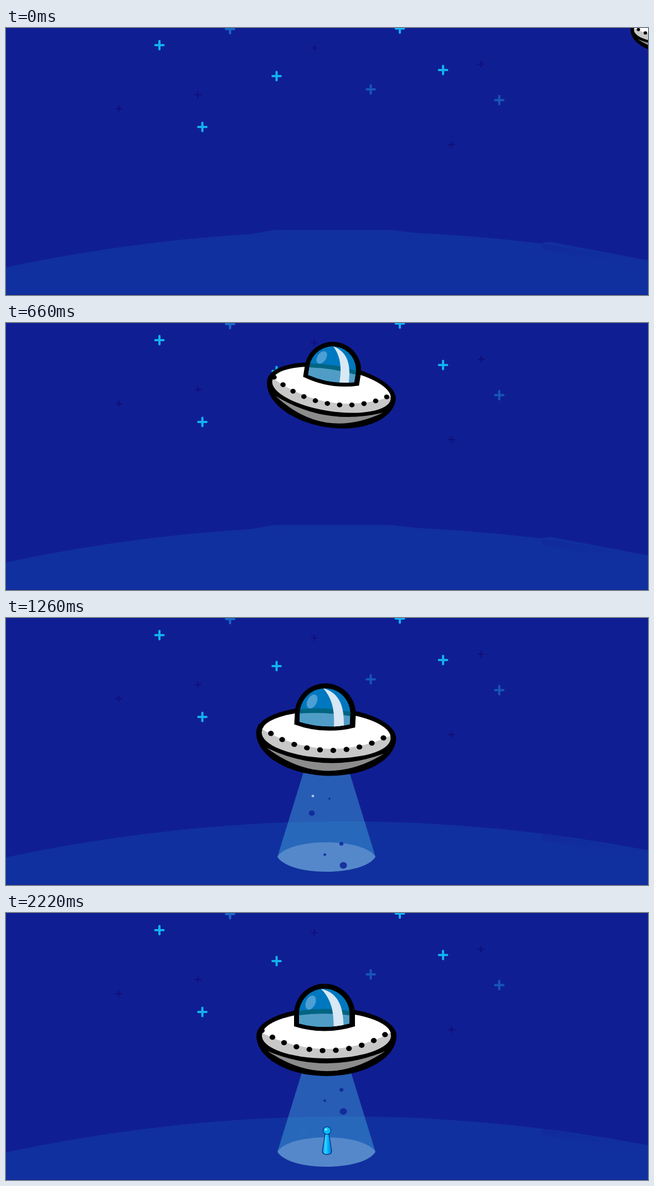
Animation of 1159x483 px, one loop 2280 ms. Source, as an HTML page:

```html
<!DOCTYPE html>
<html lang="en">
<head>
<meta charset="utf-8">
<title>Saucer landing</title>
<style>
  html, body { margin: 0; width: 100%; height: 100%; overflow: hidden; background: #101e94; }
  svg { display: block; width: 100%; height: 100%; }
  #stars { fill: none; stroke-linecap: round; }
</style>
</head>
<body>
<svg viewBox="0 0 1159 483" preserveAspectRatio="none">
  <defs>
    <linearGradient id="haze" x1="0" y1="0" x2="0" y2="1">
      <stop offset="0" stop-color="#10289b" stop-opacity=".9"/>
      <stop offset="1" stop-color="#11309f" stop-opacity="0"/>
    </linearGradient>
    <linearGradient id="plastic">
      <stop offset="0" stop-color="#0a7de0"/>
      <stop offset=".35" stop-color="#35d6ff"/>
      <stop offset=".6" stop-color="#00b4ff"/>
      <stop offset="1" stop-color="#0074dc"/>
    </linearGradient>
    <clipPath id="glass">
      <path d="M-49.5-22V-39.5A45.5 45.5 0 0 1 41.5-39.5V-22Q-4-10-49.5-22Z"/>
    </clipPath>
  </defs>

  <rect width="1159" height="483" fill="#101e94"/>
  <g id="stars"></g>

  <g fill="#11309f">
    <path d="M0 433Q579.5 310 1159 420V483H0Z"/>
    <path id="plateau" d="M435 374L485 365.5H695L760 373ZM960 390L983 387L1120 413Z"/>
  </g>
  <path d="M968 391L1159 420V438L968 402Z" fill="url(#haze)"/>
  <rect y="482" width="1159" height="1" fill="#10268f"/>

  <g id="beam">
    <path d="M549 240H608L667 432C645 468 512 468 490 432Z" fill="#49bbe4" fill-opacity=".4"/>
    <path d="M490 432C512 397 645 397 667 432C645 468 512 468 490 432Z" fill="#fff" fill-opacity=".21"/>
    <g id="motes"></g>
    <g id="pawn" stroke="#08246f" stroke-width="1.2" stroke-linejoin="round">
      <path d="M-3.5-12H3.5L8.4 19Q8.6 24.5 0 24.8Q-8.6 24.5-8.4 19Z" fill="url(#plastic)"/>
      <circle cy="-18.5" r="7" fill="#00bcff"/>
      <ellipse cx="-2" cy="-20.5" rx="2.6" ry="2" fill="#7ce9ff" stroke="none"/>
    </g>
  </g>

  <g id="ship">
    <path d="M-126.5 0A126.5 51 0 0 1 126.5 0A126.5 73 0 0 1-126.5 0Z"/>
    <ellipse rx="116.5" ry="41" fill="#c8c8c8"/>
    <path d="M-116-5A116.5 41 0 0 1 116-5Q0 53-116-5Z" fill="#fff"/>
    <path d="M-106 28Q0 72 106 28Q0 100-106 28Z" fill="#8c8c8c"/>
    <g id="rim"></g>
    <path d="M-58.5-17V-39A55 55 0 0 1 51.5-39V-17Q-3.5 0-58.5-17Z"/>
    <g clip-path="url(#glass)">
      <rect x="-50" y="-86" width="92" height="76" fill="#0078bf"/>
      <path d="M-50-45Q-4-52 42-45V-30H-50Z" fill="#006482"/>
      <path d="M-50-37Q-4-43 42-37V-8H-50Z" fill="#4f9dc6"/>
      <path d="M-10-85C20-78 31-55 31-14H13C14-50 5-70-10-85Z" fill="#d8e8f4"/>
      <ellipse rx="8.5" ry="13.5" transform="translate(-28.5-60) rotate(25)" fill="#4d9fd4"/>
    </g>
  </g>
</svg>

<script>
const LOOP = 2280, STEP = 60, RIM_GAP = 24;
const MOTE_SPEED = .337, MOTE_TRAVEL = 235, MOTE_FLOOR = 455;

const $ = id => document.getElementById(id);
const mod = (a, n) => ((a % n) + n) % n;
const clamp = v => Math.max(0, Math.min(1, v));
const easeOut = (u, power) => 1 - (1 - clamp(u)) ** power;
const easeInOut = u => (1 - Math.cos(Math.PI * clamp(u))) / 2;

function add(parent, name, attrs) {
  const el = document.createElementNS('http://www.w3.org/2000/svg', name);
  for (const key in attrs) el.setAttribute(key, attrs[key]);
  return parent.appendChild(el);
}

function addStars(stroke, arm, width, ...spots) {
  const d = spots.map(([x, y]) => `M${x - arm} ${y}h${2 * arm}M${x} ${y - arm}v${2 * arm}`).join('');
  add($('stars'), 'path', { stroke, 'stroke-width': width, d });
}
addStars('#12b2ee', 7.4, 4, [277, 31], [488.5, 87], [354.5, 179], [789, 76], [711, 1]);
addStars('#1656b8', 7.4, 4, [658.5, 111], [890.5, 130.5]);
addStars('#1a68c4', 7.4, 4, [404.5, 2]);
addStars('#10107c', 5, 2.4, [203.5, 146], [346.5, 120.5], [556.5, 36], [857.5, 65.5], [804.5, 211]);

// Each mote starts its climb at height y
function addMote(light, x, y, r) {
  const el = add($('motes'), 'ellipse', {
    cx: x, rx: r, ry: r * .9, fill: light ? '#c4e2f4' : '#102597', opacity: .88
  });
  return { light, y, el };
}
const motes = [
  addMote(true, 554, 322, 2.5),
  addMote(true, 537, 487, 5.5),
  addMote(false, 609, 447.5, 6.6),
  addMote(false, 552, 353, 5.4),
  addMote(false, 584, 327, 2),
  addMote(false, 605.5, 408.5, 3.6),
  addMote(false, 575.5, 428, 2.5)
];

const rim = Array.from({ length: 13 }, () => add($('rim'), 'ellipse', { rx: 5.2, ry: 4.7 }));

const place = (el, x, y, tilt, scale) =>
  el.setAttribute('transform', `translate(${x} ${y}) rotate(${tilt}) scale(${scale})`);

// The saucer swoops in, hovers, then sinks while its swing dies out
function drawShip(t) {
  const tilt = -1 - 5 * easeInOut(t / 180) + 17 * easeInOut((t - 180) / 620) - 11 * easeInOut((t - 800) / 700);
  const x = 1204.5 - 626 * easeOut(t / 1032, 4) - .17 * tilt;
  const y = 2 + 91 * easeOut(t / 360, 4) + 129 * easeOut((t - 545) / 985, 2);
  place($('ship'), x, y, tilt, .61 + .39 * easeInOut(t / 920));
}

function drawRim(t) {
  const spin = 69 * (1 - Math.cos(.00084 * (2220 - t)));
  const phase = mod(spin - 7, RIM_GAP);
  rim.forEach((dot, i) => {
    const angle = (phase + RIM_GAP * (i - 6)) / 180;
    dot.setAttribute('cx', 180 * Math.sin(angle));
    dot.setAttribute('cy', 27 - 152 * (1 - Math.cos(angle)));
    dot.setAttribute('visibility', Math.abs(angle) < .73 ? 'inherit' : 'hidden');
  });
}

function drawBeam(t) {
  $('beam').setAttribute('opacity', clamp((t - 900) / 240));
  for (const { light, y, el } of motes) {
    const climb = MOTE_FLOOR - y + MOTE_SPEED * (t - 1260);
    const height = MOTE_FLOOR - mod(climb, MOTE_TRAVEL);
    el.setAttribute('cy', height);
    if (light) el.setAttribute('opacity', .8 * clamp((400 - height) / 60));
  }
}

function drawPawn(t) {
  const drop = easeOut((t - 1440) / 780, 2.3);
  $('pawn').setAttribute('visibility', drop > 0 ? 'inherit' : 'hidden');
  place($('pawn'), 583 - 3.5 * drop, 240 + 172 * drop, 150 * (1 - drop), .78 + .22 * drop);
}

function draw(t) {
  $('plateau').setAttribute('visibility', t < 840 ? 'visible' : 'hidden');
  drawShip(t);
  drawRim(t);
  drawBeam(t);
  drawPawn(t);
}

const start = performance.now();
function tick() {
  const t = mod(performance.now() - start, LOOP);
  draw(Math.floor(t / STEP) * STEP);
  requestAnimationFrame(tick);
}
tick();
</script>
</body>
</html>
```
